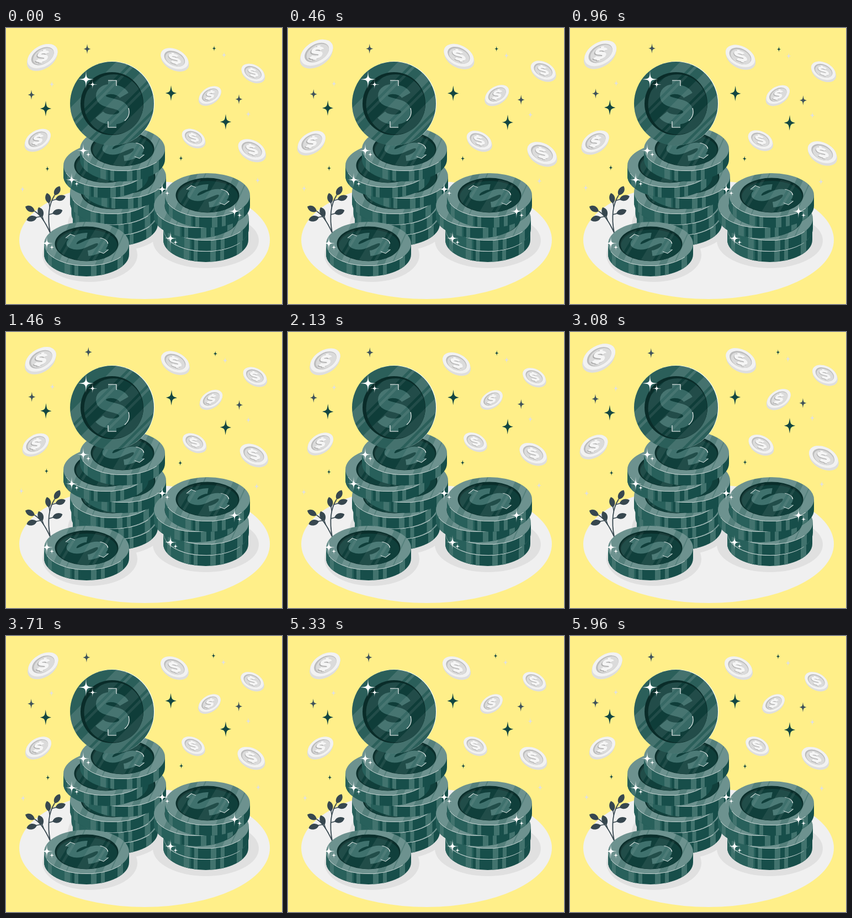
Animation of 500 by 500 pixels, one loop 6000 ms. Source, as an HTML page:

```html
<!DOCTYPE html>
<html>
<head>
<meta charset="utf-8">
<style>
html, body { margin: 0; width: 100%; height: 100%; overflow: hidden; background: #ffef89; }
svg { display: block; width: 100vw; height: 100vh; }
</style>
</head>
<body>
<svg id="stage" viewBox="0 0 500 500"></svg>
<script>
const times = (n, f) => Array.from({ length: n }, (_, i) => f(i)).join('');
const at = (x, y, body, more = '') => `<g transform="translate(${x} ${y}) ${more}">${body}</g>`;
const oval = (x, y, rx, ry, fill) => `<ellipse cx="${x}" cy="${y}" rx="${rx}" ry="${ry}" fill="${fill}"/>`;
const path = (d, fill, more = '') => `<path d="${d}" fill="${fill}" ${more}/>`;
const line = (d, color, width) => path(d, 'none', `stroke="${color}" stroke-width="${width}"`);
const clip = (id, shape) => `<clipPath id="${id}">${shape}</clipPath>`;
const clipped = (id, body) => `<g clip-path="url(#${id})">${body}</g>`;

// Dollar sign centred on 0,0 for a coin of radius 76
const dollar = color =>
  line('M22-15C14-29-20-31-20-14C-20 4 22-5 22 15C22 32-12 33-23 20', color, 18) +
  path('M-7-42h15v15h-15zM-7 28h15v15h-15z', color);
const shine = line('M-7-42h15v10M-7 32v11h15M30 8Q34 22 23 31', '#fff', 1.1);

// Four-pointed star; k is the pinch of its sides
const star = (x, y, rx, ry, fill, k) => {
  const a = rx * k, b = ry * k;
  const side = (u, v, ex, ey) => `C${u} ${v} ${u} ${v} ${ex} ${ey}`;
  return at(x, y, path(`M0 ${-ry}${side(a, -b, rx, 0)}${side(a, b, 0, ry)}${side(-a, b, -rx, 0)}${side(-a, -b, 0, -ry)}`, fill));
};

// Slanted light: a wide band followed by a narrow one, repeated
const bands = (start, wide, step, slope, alpha) => times(3, i => {
  const band = (s, w) => path(`M${s + 90 * slope}-90h${w}L${s + w - 90 * slope} 90h${-w}z`, '#fff', `opacity="${alpha}"`);
  const s = start + i * step;
  return band(s, wide) + band(s + wide * 1.25, wide / 4);
});

const rib = (x, w, color) => `<rect x="${x}" width="${w}" height="60" fill="${color}"/>`;
const sidePath = 'M-77 0V19A77 40 0 0 0 77 19V0z';
const flatCoin =
  path(sidePath, '#174e4a') +
  clipped('side', rib(-77, 50, '#28605b') + times(6, i => rib(-70 + i * 24 + i % 2 * 6, 7 + i % 2 * 3, '#42736e'))) +
  oval(0, 0, 77, 40, '#55807c') +
  clipped('top', bands(-100, 52, 80, .45, .14)) +
  line('M-72 14A77 40 0 0 0 62 23.7', '#fff', .7) +
  oval(0, 0, 57.5, 31.5, '#0a2e2b') +
  oval(1, 2.5, 54.5, 28.5, '#103f3b') +
  clipped('well', at(0, 0, dollar('#3f716d') + shine, 'scale(1 .56) rotate(-54)') + bands(-62, 22, 62, .6, .07));

const bigCoin =
  oval(1, -.5, 76, 76, '#fff') +
  oval(0, 0, 76, 76, '#2b5f5a') +
  clipped('disc', bands(-68, 27, 63, 1, .12)) +
  oval(0, 0, 57, 57, '#0a2c29') +
  oval(3, 1.5, 53.5, 54.5, '#0f3d39') +
  dollar('#376965') + shine +
  clipped('dial', bands(-68, 27, 63, 1, .08));

const paleCoin = (x, y, r, tilt) => {
  const edge = times(6, i => at(-Math.sign(tilt) * -i * .2, i * r / 30, oval(0, 0, r, r * .63, '#dedede'), `rotate(${tilt})`));
  const face = oval(0, 0, 76, 76, '#f2f2f2') + oval(0, 0, 57, 57, '#bdbdbd') + oval(3, 4, 52, 52, '#dbdbdb') +
    at(0, 0, at(-4, 4, dollar('#adadad')) + dollar('#f5f5f5'), `rotate(${tilt < 0 ? 34 : -34})`);
  return at(x, y, edge + at(0, 0, face, `rotate(${tilt}) scale(${r / 76} ${r * .63 / 76})`));
};
const paleCoins = (tilt, spots) => spots.map(([x, y, r]) => paleCoin(x, y, r, tilt)).join('');

// n coins upwards, each shifted by dx, dy
const pile = (x, y, n, dx, dy) => times(n, i => `<use href="#flat" x="${x + i * dx}" y="${y + i * dy}"/>`);

const stars = (r, color, spots) => spots.map(([x, y]) => star(x, y, r * .72, r, color, .17)).join('');

const glints = [[145, 93], [140, 222], [119, 275], [283, 292], [414, 332], [298, 381], [74, 390]].map(([x, y], i) => {
  const r = i ? 13 : 17;
  return star(x, y, r, r, '#fff', .04) + star(x + r * .7, y + r * .55, r * .5, r * .5, '#fff', .04);
}).join('');

// Curved stem with a leaf at its tip and stalked leaves alternating along it
const leaf = (x, y, angle) =>
  at(x, y, path('M0 0C4-7 14-7 19-1C14 7 5 6 0 0', '#37474f'), `rotate(${angle})`);
const sprig = (cx, cy, ex, ey, count, first) => {
  const point = (a, c, e, t) => (1 - t) ** 2 * a + 2 * t * (1 - t) * c + t * t * e;
  const heading = Math.atan2(ey - cy, ex - cx) * 180 / Math.PI;
  const branches = times(count, i => {
    const t = .42 + i * .2, side = i % 2 ? -first : first;
    const x = point(80, cx, ex, t), y = point(371, cy, ey, t);
    return at(x, y, line('M0 0H9', '#37474f', 1.5) + leaf(7, 0, 0), `rotate(${heading + side * 42})`);
  });
  return line(`M80 371Q${cx} ${cy} ${ex} ${ey}`, '#37474f', 1.8) + branches + leaf(ex, ey, heading);
};

stage.innerHTML =
  '<defs>' +
    clip('side', path(sidePath, '#000')) + clip('top', oval(0, 0, 77, 40, '#000')) +
    clip('well', oval(1, 1, 56, 30, '#000')) + clip('disc', oval(0, 0, 76, 76, '#000')) +
    clip('dial', oval(3, 1.5, 53.5, 54.5, '#000')) + `<g id="flat">${flatCoin}</g>` +
  '</defs>' +
  oval(251, 384, 227, 107, '#f0f0f0') +
  oval(200, 355, 88, 49, '#e0e0e0') + oval(362, 385, 96, 50, '#e0e0e0') + oval(152, 411, 86, 49, '#e0e0e0') +
  '<g id="sky">' +
    stars(14, '#134742', [[72, 146], [299, 118], [398, 170]]) +
    stars(9, '#3f535b', [[147, 38], [46, 121], [422, 129]]) +
    stars(5, '#134742', [[377, 37], [317, 236], [75, 255]]) +
    stars(6, '#e0e0e0', [[395, 49], [83, 102], [439, 156], [456, 276], [30, 292]]) +
  '</g><g id="floaters">' +
    paleCoins(-30, [[67.5, 51.5, 29.5], [369, 121.5, 21.5], [59, 201, 25]]) +
    paleCoins(26, [[305, 56, 26.5], [446, 81, 22], [339, 198, 22], [444, 219.5, 26]]) +
  '</g>' +
  sprig(72, 328, 88, 303, 3, 1) + sprig(66, 340, 52, 332, 2, 1) +
  pile(198, 336, 3, -2.5, -19.5) + pile(213, 269, 2, -32, -20) + pile(211, 219, 1, 0, 0) +
  pile(362, 365, 2, 1, -20) + pile(345, 322, 2, 20, -19) + pile(146, 391, 1, 0, 0) +
  at(192, 137, bigCoin) + glints;

const sky = document.getElementById('sky'), floaters = document.getElementById('floaters');

// Linear ramps: a triangle wave for the sway, two unequal-sided pulses for the beat
const sway = p => Math.abs((p + .75) % 1 * 4 - 2) - 1;
const pulse = (p, peak, rise, fall) => Math.max(0, 1 - (p < peak ? (peak - p) / rise : (p - peak) / fall));
const beat = p => 1 + .1 * (pulse(p, .1, .1, .2) + pulse(p, .5, .1, .1));

function draw() {
  const p = (performance.now() + 40) / 6000 % 1;
  sky.setAttribute('transform', `rotate(${sway(p)} 243 163)`);
  floaters.setAttribute('transform', `translate(252 135) scale(${beat(p)}) translate(-252 -135)`);
  requestAnimationFrame(draw);
}
draw();
</script>
</body>
</html>
```
